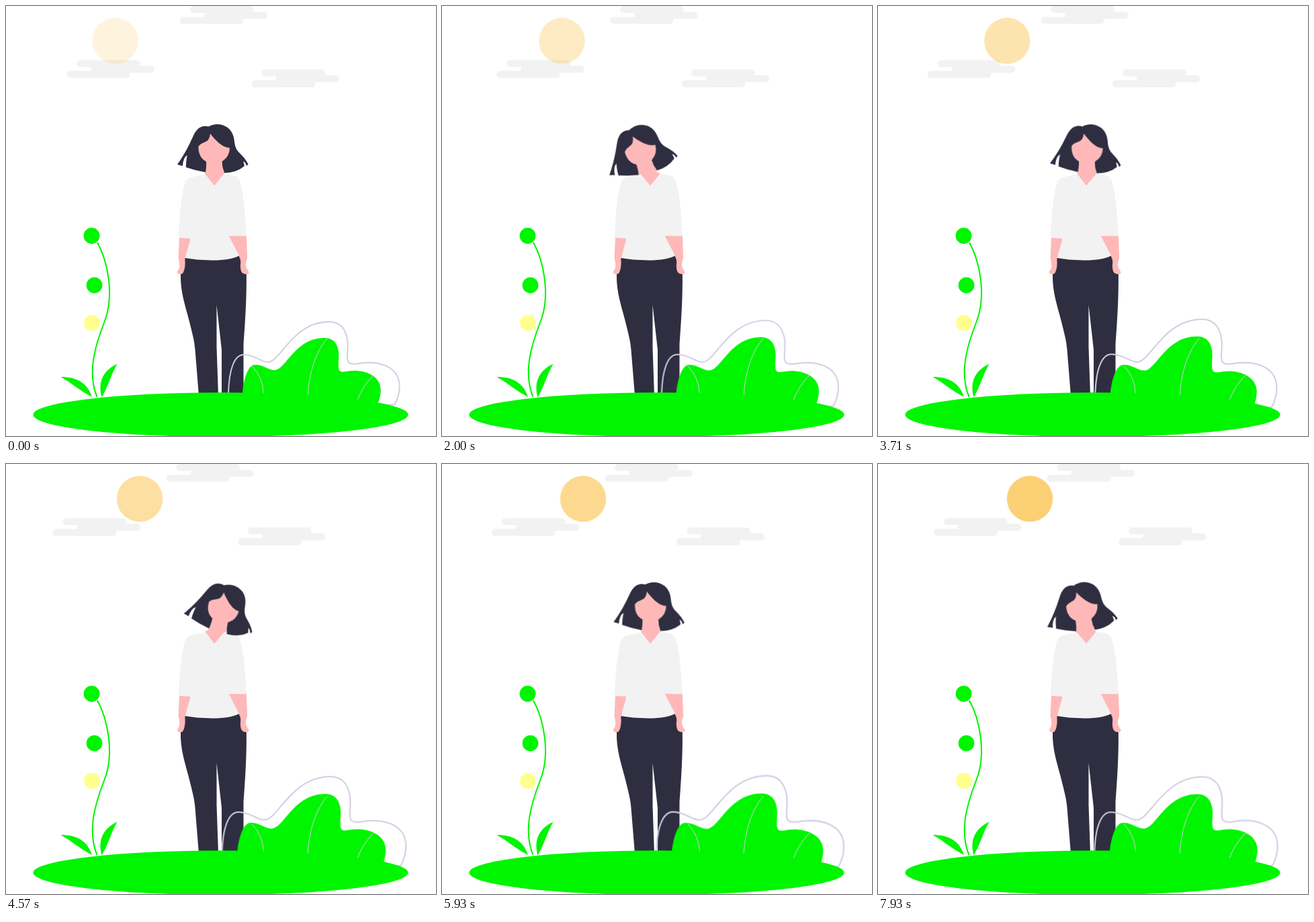
Animation of 640 by 640 pixels, one loop 8000 ms. Source, as an HTML page:

```html
<!DOCTYPE html>
<html lang="en">
<head>
<meta charset="utf-8">
<title>Breezy garden</title>
<style>
  html, body { margin: 0; width: 100%; height: 100%; overflow: hidden; background: #fff; }
  svg { display: block; width: 100%; height: 100%; }
  .green { fill: #00f500; }
  .dark { fill: #2f2e41; }
  .skin { fill: #ffb8b8; }
  .pale { fill: #f2f2f2; }
  .line { fill: none; stroke: #d0cde1; }

  .sun, .clouds, .head, .bush { animation: 8s linear infinite; transform-box: view-box; }
  .sun { fill: #fbc75a; animation-name: rise; }
  .clouds { animation-name: drift; }
  .head { transform-origin: 309.3px 265px; animation-name: sway; }
  .bush { transform-origin: 458px 532px; animation-name: swell; }

  @keyframes rise {
    from { transform: translateX(0); opacity: .2; }
    to { transform: translateX(64px); opacity: .845; }
  }
  @keyframes drift {
    0% { transform: translateX(0); }
    59.9% { transform: translateX(-21.5px); }
    100% { transform: translateX(-7.1px); }
  }
  @keyframes sway {
    0% { transform: rotate(0deg); }
    30.05% { transform: rotate(-18.9deg); }
    59.85% { transform: rotate(18.9deg); }
    89.55% { transform: rotate(-18.9deg); }
    100% { transform: rotate(-5.7deg); }
  }
  @keyframes swell {
    0% { transform: scale(1); }
    76.3% { transform: scale(1.1); }
    100% { transform: scale(1.069); }
  }
</style>
</head>
<body>
<svg viewBox="0 0 640 640">
  <defs>
    <g id="cloud">
      <rect x="15" width="94.7" height="10.3" rx="5.15"/>
      <rect x="36" y="8.7" width="94.5" height="10.3" rx="5.15"/>
      <rect y="16.2" width="94.7" height="10.3" rx="5.15"/>
    </g>
  </defs>

  <g class="clouds pale">
    <use href="#cloud" x="90.2" y="80.4"/>
    <use href="#cloud" x="258.8" y="0"/>
    <use href="#cloud" x="365.5" y="94.4"/>
  </g>
  <circle class="sun" cx="162.5" cy="51.8" r="34.2"/>

  <!-- Flower -->
  <path d="M136 352C151 379 162 430 146.500 470C132 507 121 546 135.500 582" fill="none" stroke="#00f500" stroke-width="2"/>
  <g class="green">
    <circle cx="127.500" cy="342" r="11.900"/>
    <circle cx="131.500" cy="415.700" r="11.900"/>
    <path d="M81.500 552C104 552 121 560 128 582Q115 575 104 567Q94 559 81.500 552Z"/>
    <path d="M165.500 532.500C142 544 137 562 142.500 582.500Q149 571 154 558Q159 544 165.500 532.500Z"/>
  </g>
  <circle cx="128" cy="471.700" r="11.900" fill="#ffff8d"/>

  <!-- Woman -->
  <path class="dark" d="M266 370L260 398C259 425 267 446 273 470C278 490 280.500 499 281.500 512L287 580H316L313.500 508V445L321 512V580H353.500V503C356 470 358.500 432 357.800 396L349 368Z"/>
  <path class="skin" d="M258 343L256.500 376Q259.500 385 257.500 391L254.500 396Q255.500 400 262 398.800C265 397 267.500 387 266.300 377L274 350V343Z"/>
  <path class="skin" d="M331 341L347.500 374Q350 379 348.800 386C349 397 352 399 358.500 399Q362.500 398 361.500 396L358 390Q355.500 384 359.200 375L357.800 341Z"/>
  <path class="skin" d="M296 249L310 268L325 249L310 244Z"/>
  <g class="head skin">
    <ellipse cx="309.800" cy="211" rx="23.800" ry="23.500"/>
    <path d="M298 225V232Q298.500 242 296 250L310 266L325 249Q321.500 240 321.500 232V225Z"/>
  </g>
  <path class="pale" d="M296 250.500L310 267.500L325 250Q341 251 345.500 256C353 268 356.500 310 357.800 342.500L331 342L347 371.500Q335 378.500 307 378.500Q282 378 266.500 375L273.800 350V346L257 345C258 312 261 283 265.500 266Q267.500 257 275 255Z"/>
  <path class="head dark" d="M255 236C266 220 272 208 278 195C284 181 292 177 301.500 179.500C310 174 322 175 330 181C337 187 339 193 340 202C342 220 351 217 360.500 235.500L358 238Q356 231 353 231.500Q355 235 354.500 238.500Q343 248 325 248.500Q321.500 240 321.500 231.500Q333 224 333 211C322 211 311 199 304 190Q303 201 295 203Q289 205 286.500 209Q286 225 298 231.500Q298.500 240 297 247.500Q282 245 267.800 240Q268 229 269.800 222Q263.500 226 263 238Z"/>

  <!-- Bush -->
  <g class="bush">
    <path class="line" stroke-width="1.9" d="M331 593.500V576C332 540 340 519 354 519C370 519 379 530 390 530C408 530 427 470 481 470C505 470 510 494 508.500 512C506.500 531 509 534 522 532.500C553 527 586 535 585.700 567Q585.500 580 578.500 593.500Z"/>
    <path class="green" d="M351 590L352 575C355 548 362 534.500 370 534C382 533 390 542 400 542C417 541 430 494 474 494C492 494 497 510 495 528C494 545 496 546 509 543.500C531 540 558 549 557.700 572Q557.500 582 553 593Z"/>
  </g>
  <g class="line">
    <path d="M366 536Q382 552 383.500 577"/>
    <path d="M478 494.500Q453 524 449 580"/>
    <path d="M547 549.500Q531 565 522.500 588"/>
  </g>

  <ellipse class="green" cx="319.500" cy="608.300" rx="279" ry="33"/>
</svg>
</body>
</html>
```
